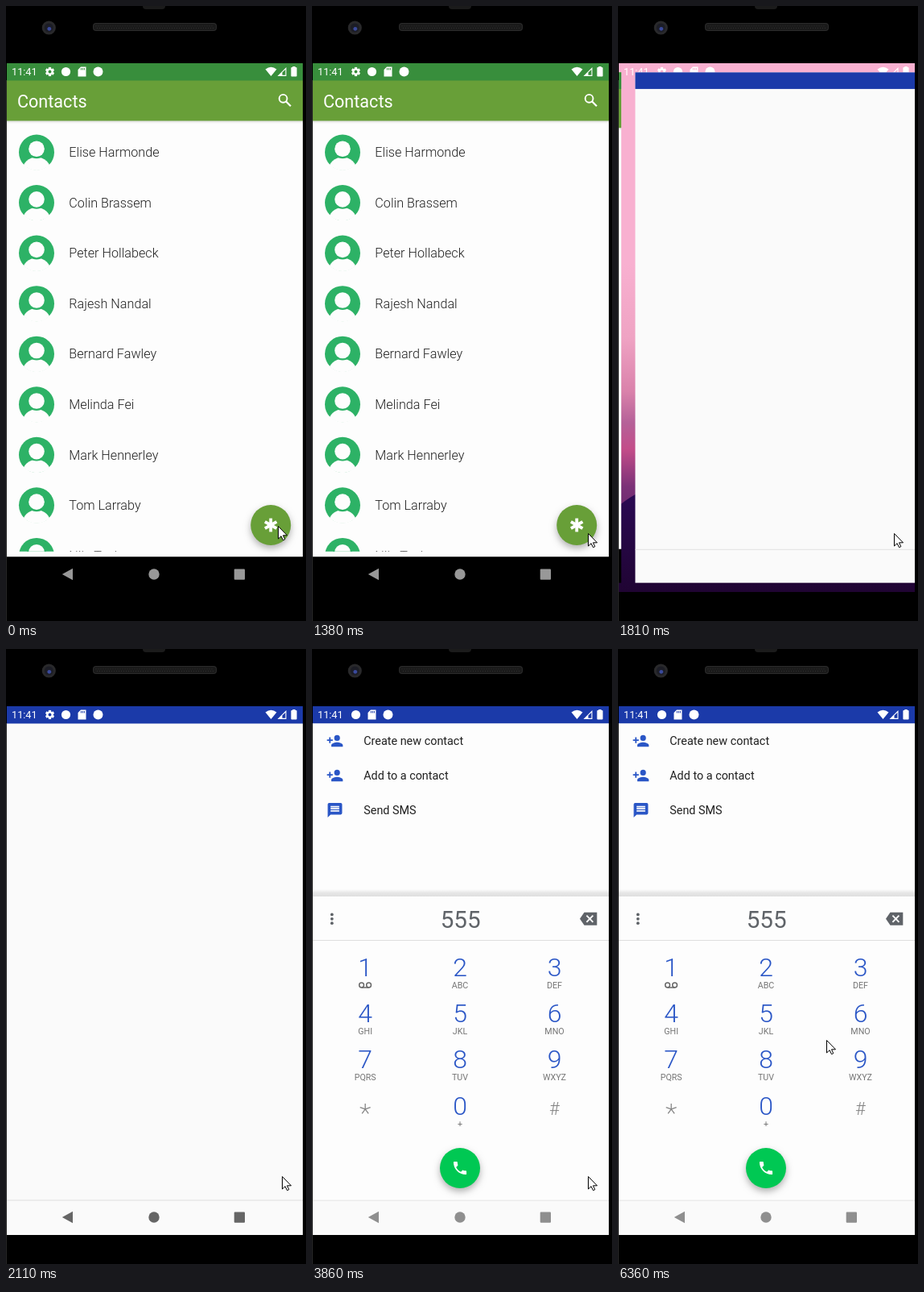
An HTML page with a canvas that plays this animation: 373 by 763 pixels, repeating every 8 s.

```html
<!DOCTYPE html>
<html lang="en">
<head>
<meta charset="utf-8">
<title>Contacts and dialer</title>
<style>
html, body { margin: 0; width: 100%; height: 100%; overflow: hidden; background: #000; }
canvas { display: block; width: 373px; height: 763px; }
</style>
</head>
<body>
<canvas id="stage"></canvas>
<script>
const W = 373, H = 763, LOOP = 8000;
const SCREEN = { x: 1, y: 71, w: 368, h: 656 };
// bottom edges of the status bar and the toolbar, top edge of the navigation bar
const BAR = 92.5, TOOLBAR = 142.5, NAV = 683.5;
const GREEN = '#689f38', BLUE = '#2a56c6', GREY = '#5f6368';
const FONT = 'Roboto, "Noto Sans", sans-serif';
const canvas = document.getElementById('stage');
const ctx = canvas.getContext('2d');
const dpr = window.devicePixelRatio || 1;
canvas.width = W * dpr;
canvas.height = H * dpr;

const people = ['Elise Harmonde', 'Colin Brassem', 'Peter Hollabeck', 'Rajesh Nandal',
  'Bernard Fawley', 'Melinda Fei', 'Mark Hennerley', 'Tom Larraby', 'Nils Tesk'];
const dialed = '555';
const keys = [['1', ''], ['2', 'ABC'], ['3', 'DEF'], ['4', 'GHI'], ['5', 'JKL'], ['6', 'MNO'],
  ['7', 'PQRS'], ['8', 'TUV'], ['9', 'WXYZ'], ['*', ''], ['0', '+'], ['#', '']];

// 24-unit icons
const icons = {
  addPerson: new Path2D('M15 12a4 4 0 1 0 0-8 4 4 0 0 0 0 8zM6 10V7H4v3H1v2h3v3h2v-3h3v-2zM15 14c-2.67 0-8 1.34-8 4v2h16v-2c0-2.66-5.33-4-8-4z'),
  chat: new Path2D('M20 2H4a2 2 0 0 0-2 2v18l4-4h14a2 2 0 0 0 2-2V4a2 2 0 0 0-2-2zM6 12h12v2H6zM6 9h12v2H6zM6 6h12v2H6z'),
  call: new Path2D('M6.6 10.8c1.45 2.8 3.8 5.1 6.6 6.6l2.2-2.2c.3-.3.7-.4 1-.25 1.1.4 2.3.55 3.6.55a1 1 0 0 1 1 1V20a1 1 0 0 1-1 1C10.6 21 3 13.4 3 4a1 1 0 0 1 1-1h3.5a1 1 0 0 1 1 1c0 1.25.2 2.45.55 3.6.1.35 0 .7-.25 1z')
};

// [time, x, y]; each position holds until the next one
const cursorSteps = [[0, 338, 645], [130, 338, 647], [430, 340, 650], [550, 342, 652], [670, 343, 654],
  [5660, 325, 623], [5820, 312, 594], [5940, 299, 563], [6090, 277, 519], [6240, 267, 501], [6360, 259, 485]];
// [time, scale, horizontal offset]
const slideSteps = [[1660, 0.95, 52], [1810, 0.966, 14], [1960, 0.996, 1]];

const at = (steps, t) => steps.filter(s => s[0] <= t).pop();

function rect(x, y, w, h, fill) {
  ctx.fillStyle = fill;
  ctx.fillRect(x, y, w, h);
}
function band(y1, y2, fill) {
  rect(SCREEN.x, y1, SCREEN.w, y2 - y1, fill);
}
function disc(x, y, r, fill) {
  ctx.fillStyle = fill;
  ctx.beginPath();
  ctx.arc(x, y, r, 0, Math.PI * 2);
  ctx.fill();
}
function ring(x, y, r, width, color) {
  ctx.strokeStyle = color;
  ctx.lineWidth = width;
  ctx.beginPath();
  ctx.arc(x, y, r, 0, Math.PI * 2);
  ctx.stroke();
}
function poly(points, fill) {
  ctx.fillStyle = fill;
  ctx.beginPath();
  points.forEach(([x, y]) => ctx.lineTo(x, y));
  ctx.closePath();
  ctx.fill();
}
function line(x1, y1, x2, y2, width, color) {
  ctx.strokeStyle = color;
  ctx.lineWidth = width;
  ctx.beginPath();
  ctx.moveTo(x1, y1);
  ctx.lineTo(x2, y2);
  ctx.stroke();
}
function round(x, y, w, h, r, fill) {
  ctx.fillStyle = fill;
  ctx.beginPath();
  ctx.roundRect(x, y, w, h, r);
  ctx.fill();
}
function text(str, x, y, size, color, weight = 400, align = 'left') {
  ctx.font = `${weight} ${size}px ${FONT}`;
  ctx.textAlign = align;
  ctx.fillStyle = color;
  ctx.fillText(str, x, y);
}
function vertical(y1, y2, stops) {
  const g = ctx.createLinearGradient(0, y1, 0, y2);
  stops.forEach(([p, c]) => g.addColorStop(p, c));
  return g;
}
function icon(name, cx, cy, size, color) {
  ctx.save();
  ctx.translate(cx - size / 2, cy - size / 2);
  ctx.scale(size / 24, size / 24);
  ctx.fillStyle = color;
  ctx.fill(icons[name], 'evenodd');
  ctx.restore();
}
function star(cx, cy, arms, r, width, color) {
  for (let i = 0; i < arms; i++) {
    const a = -Math.PI / 2 + i * Math.PI * 2 / arms;
    line(cx, cy, cx + r * Math.cos(a), cy + r * Math.sin(a), width, color);
  }
}
function raisedDisc(x, y, r, fill, lift = 1) {
  ctx.save();
  ctx.shadowColor = 'rgba(0,0,0,.3)';
  ctx.shadowBlur = 8 * lift * dpr;
  ctx.shadowOffsetY = 4 * lift * dpr;
  disc(x, y, r, fill);
  ctx.restore();
}

function drawBezel() {
  rect(0, 0, W, H, '#000');
  rect(0, 92, 1, 671, '#262626');
  round(170, -5, 28, 9, 4, '#1b1b1b');
  disc(53.3, 27, 8.6, '#29292b');
  disc(53.3, 27, 5.5, '#1c1d26');
  disc(53.8, 28.3, 2.4, '#3a4a9c');
  round(108, 21, 154, 10, 4, '#2b2b2b');
  round(109, 22, 152, 8, 3, '#1a1a1a');
  for (let x = 112; x < 259; x += 3) {
    disc(x, 24.8, 0.6, '#333');
    disc(x + 1.5, 27.3, 0.6, '#333');
  }
}

function gear(x, y, hole) {
  for (let i = 0; i < 3; i++) {
    const a = i * Math.PI / 3, dx = 5.6 * Math.sin(a), dy = 5.6 * Math.cos(a);
    line(x - dx, y - dy, x + dx, y + dy, 3.2, '#fff');
  }
  disc(x, y, 4.3, '#fff');
  disc(x, y, 1.9, hole);
}

function drawStatus(bar, withGear) {
  text('11:41', 7, 86.3, 12.7, '#fff');
  let x = 54.5;
  if (withGear) { gear(x, 81.5, bar); x += 20; }
  disc(x, 81.5, 5.6, '#fff');
  x += 20;
  poly([[x - 5, 79], [x - 1.5, 75.5], [x + 5, 75.5], [x + 5, 87.5], [x - 5, 87.5]], '#fff');
  for (let i = 0; i < 3; i++) rect(x - 1.6 + i * 2, 77, 1, 2.4, bar);
  disc(x + 20, 81.5, 6, '#fff');

  ctx.fillStyle = '#fff';
  ctx.beginPath();
  ctx.moveTo(329.5, 87);
  ctx.lineTo(322.5, 78.6);
  ctx.quadraticCurveTo(329.5, 72.8, 336.5, 78.6);
  ctx.fill();
  poly([[337.5, 87], [348.5, 76], [348.5, 87]], '#fff');
  poly([[343.5, 82.6], [347.4, 78.7], [347.4, 85.8], [343.5, 85.8]], bar);
  rect(356.3, 75, 3.4, 2, '#fff');
  round(354.4, 76, 7.2, 11.5, 0.9, '#fff');
}

function drawNav(color) {
  poly([[69.8, 705], [83, 697.8], [83, 712.2]], color);
  disc(184, 705, 6.7, color);
  round(283.7, 698.5, 13.3, 13.3, 1, color);
}

function avatar(x, y) {
  ctx.save();
  disc(x, y, 22, '#2db266');
  ctx.beginPath();
  ctx.arc(x, y, 22.5, 0, Math.PI * 2);
  ctx.clip();
  ctx.fillStyle = '#fdfdfd';
  ctx.beginPath();
  ctx.ellipse(x, y + 22, 17.5, 16, 0, 0, Math.PI * 2);
  ctx.fill();
  disc(x, y - 4.2, 12, '#2db266');
  disc(x, y - 4.2, 9.8, '#fdfdfd');
  ctx.restore();
}

function drawFab(press) {
  raisedDisc(329.2, 644, 25, GREEN, press ? 1.7 : 1);
  if (press) {
    ctx.save();
    ctx.beginPath();
    ctx.arc(329.2, 644, 25, 0, Math.PI * 2);
    ctx.clip();
    disc(press > 1 ? 332 : 337, press > 1 ? 646 : 650, press > 1 ? 32 : 20, 'rgba(255,255,255,.22)');
    ctx.restore();
  }
  star(329.2, 644, 6, 8.4, 3.8, '#fff');
}

function drawContacts(press) {
  band(71, NAV, '#fdfdfd');
  band(71, TOOLBAR, GREEN);
  band(71, BAR, '#388e3c');
  band(TOOLBAR, 146, vertical(TOOLBAR, 146, [[0, 'rgba(0,0,0,.12)'], [1, 'rgba(0,0,0,0)']]));
  text('Contacts', 14, 126, 21.6, '#fff');
  ring(344.6, 114.8, 4.9, 1.9, '#fff');
  line(348, 118.2, 354, 124.2, 2.2, '#fff');

  ctx.save();
  ctx.beginPath();
  ctx.rect(1, 146, 368, 530.7);
  ctx.clip();
  people.forEach((name, i) => {
    const y = 181.5 + i * 62.55;
    avatar(38, y);
    text(name, 78.3, y + 5.7, 16.2, '#222', 300);
  });
  ctx.restore();
  drawFab(press);
  band(NAV, 727, '#000');
}

function drawBlank() {
  band(71, 727, '#fafafa');
  band(71, BAR, '#1b3aa9');
  band(NAV, NAV + 1, '#e0e0e0');
}

function drawKey([digit, letters], i) {
  const x = [66.2, 184, 301.5][i % 3], y = 405.7 + Math.floor(i / 3) * 57.3;
  if (digit === '*') return star(x, y - 6.8, 5, 6.8, 1.3, '#858585');
  if (digit === '#') return text(digit, x, y, 22, '#858585', 300, 'center');
  text(digit, x, y, 32, BLUE, 300, 'center');
  text(letters, x, y + 15, 10.7, '#757575', 400, 'center');
  if (digit === '1') {
    ring(61.6, 417, 2.9, 1.5, '#686868');
    ring(70.6, 417, 2.9, 1.5, '#686868');
    line(61.6, 420, 70.6, 420, 1.5, '#686868');
  }
}

function drawDialer() {
  band(BAR, NAV, '#fdfdfd');
  [['addPerson', 'Create new contact'], ['addPerson', 'Add to a contact'], ['chat', 'Send SMS']]
    .forEach(([name, label], i) => {
      const y = 114 + i * 43;
      icon(name, 28.5, y, 21.5, BLUE);
      text(label, 64.2, y + 5.2, 14.4, '#212121');
    });
  band(298, 307, vertical(298, 307, [[0, 'rgba(0,0,0,0)'], [0.5, 'rgba(0,0,0,.09)'], [1, 'rgba(0,0,0,.12)']]));
  band(307, 361, '#fdfdfd');
  band(361, 362, '#dedede');
  for (let i = -1; i < 2; i++) disc(24.8, 334.8 + i * 5.4, 1.9, GREY);
  text(dialed, 184.6, 346, 29.6, GREY, 400, 'center');
  poly([[333, 334.7], [338.5, 326.7], [354.3, 326.7], [354.3, 342.7], [338.5, 342.7]], GREY);
  line(341.4, 330.6, 349.4, 338.8, 1.9, '#fff');
  line(349.4, 330.6, 341.4, 338.8, 1.9, '#fff');
  keys.forEach(drawKey);
  raisedDisc(184, 644, 25, '#00c853');
  icon('call', 184, 644, 21.5, '#fff');
}

function drawWallpaper() {
  band(71, 727, vertical(71, 727, [[0, '#f8b0d0'], [0.38, '#f8b0d0'], [0.52, '#efa3c3'],
    [0.62, '#da82ab'], [0.68, '#b56198'], [0.73, '#c34d89'], [0.8, '#7c3278'], [1, '#3a1052']]));
  ctx.fillStyle = vertical(597, 727, [[0, '#2b0a55'], [1, '#200433']]);
  ctx.beginPath();
  ctx.moveTo(1, 620);
  ctx.quadraticCurveTo(55, 575, 110, 615);
  ctx.lineTo(369, 630);
  ctx.lineTo(369, 727);
  ctx.lineTo(1, 727);
  ctx.fill();
}

function drawWindow(cx, scale, paint) {
  ctx.save();
  ctx.translate(cx, 399);
  ctx.scale(scale, scale);
  ctx.translate(-185, -399);
  ctx.beginPath();
  ctx.rect(SCREEN.x, SCREEN.y, SCREEN.w, SCREEN.h);
  ctx.clip();
  paint();
  ctx.restore();
}

function drawSlide(t) {
  const [, scale, shift] = at(slideSteps, t);
  drawWallpaper();
  drawStatus('#f8b0d0', true);
  drawNav('#ddd');
  drawWindow(185 + shift - 368 * scale - 17, scale, () => drawContacts(0));
  drawWindow(185 + shift, scale, drawBlank);
}

function drawCursor(t) {
  const [, x, y] = at(cursorSteps, t);
  ctx.save();
  ctx.translate(x + 0.5, y + 0.5);
  ctx.beginPath();
  [[0, 0], [0, 15.5], [3.6, 12.2], [6, 17.2], [8.3, 16.2], [6, 11.3], [11, 11.3]]
    .forEach(([px, py]) => ctx.lineTo(px, py));
  ctx.closePath();
  ctx.fillStyle = '#fff';
  ctx.fill();
  ctx.strokeStyle = '#000';
  ctx.lineWidth = 1;
  ctx.stroke();
  ctx.restore();
}

function draw(t) {
  ctx.setTransform(dpr, 0, 0, dpr, 0, 0);
  drawBezel();
  ctx.save();
  ctx.beginPath();
  ctx.rect(SCREEN.x, SCREEN.y, SCREEN.w, SCREEN.h);
  ctx.clip();
  if (t < 1660) {
    drawContacts(t < 1080 || t >= 1380 ? 0 : t < 1230 ? 1 : 2);
    drawStatus('#388e3c', true);
    drawNav('#989898');
  } else if (t < 2110) {
    drawSlide(t);
  } else {
    drawBlank();
    if (t >= 3730) {
      ctx.globalAlpha = t < 3860 ? 0.55 : 1;
      drawDialer();
      ctx.globalAlpha = 1;
    }
    drawStatus('#1b3aa9', t < 3730);
    drawNav(t < 3280 ? '#666' : t < 3580 ? '#7b7b7b' : '#8f8f8f');
  }
  ctx.restore();
  drawCursor(t);
}

const start = performance.now();
function tick() {
  draw((performance.now() - start) % LOOP);
  requestAnimationFrame(tick);
}
tick();
</script>
</body>
</html>
```
